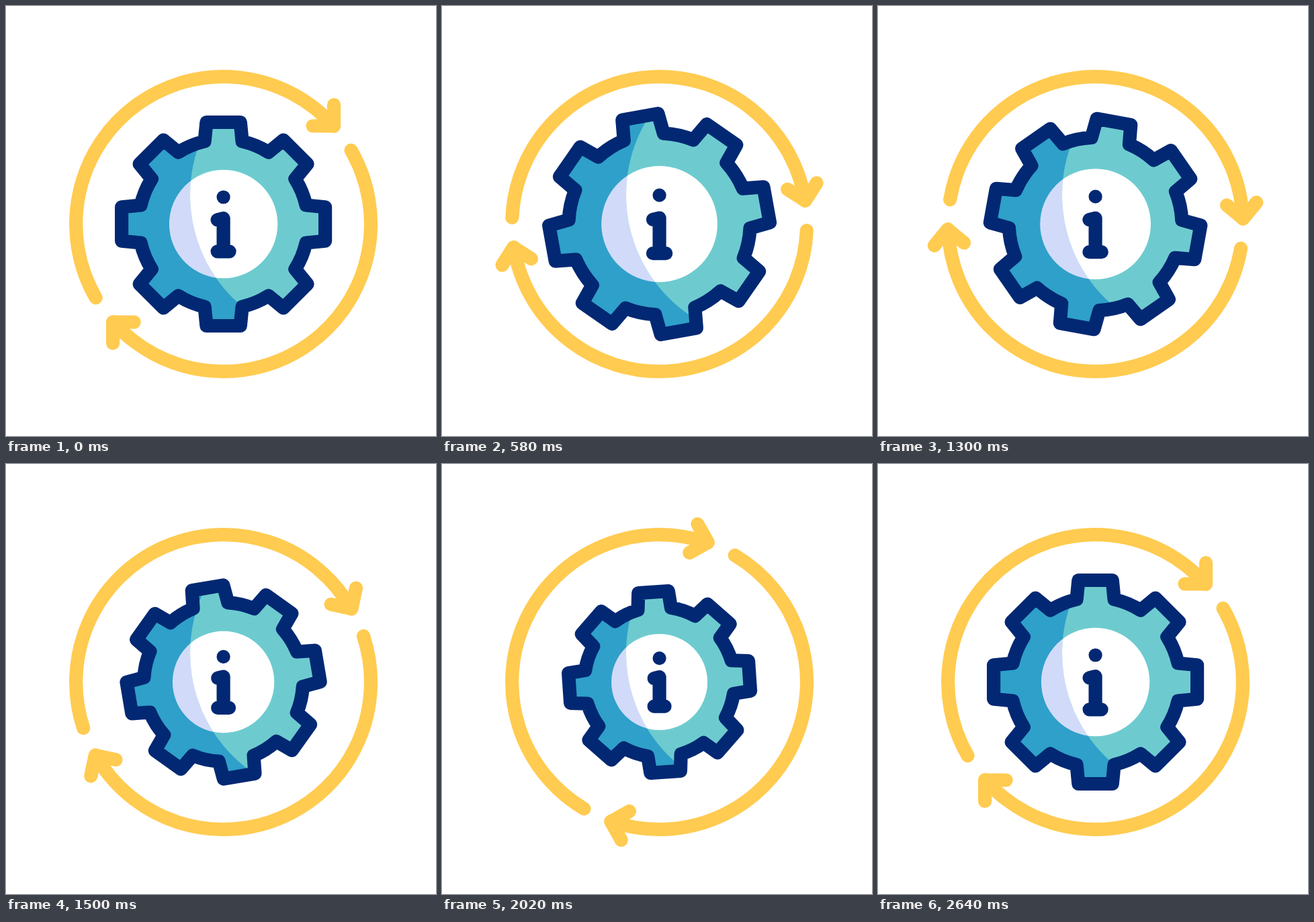
Animation, 640 px wide and 640 px high, one loop 3000 ms. Source, as an HTML page:

```html
<!DOCTYPE html>
<html lang="en">
<head>
<meta charset="utf-8">
<title>Information gear</title>
<style>
  html, body { margin: 0; width: 100%; height: 100%; overflow: hidden; background: #fff; }
  svg { display: block; width: 100vw; height: 100vh; }
  .line { fill: none; stroke: #022873; stroke-width: 20.2; stroke-linecap: round; stroke-linejoin: round; }
  .line * { vector-effect: non-scaling-stroke; }
  .arrows { stroke: #ffcb50; }
</style>
</head>
<body>
<svg viewBox="0 0 640 640">
  <defs>
    <path id="gear"/>
    <circle id="hub" r="80.7"/>
    <g id="arrow">
      <path id="arc"/>
      <path d="M-164.5 177.3V146H-133"/>
    </g>
    <clipPath id="lit"><circle cx="167.4" cy="-43.4" r="217"/></clipPath>
  </defs>
  <g transform="translate(323.6 324.5)">
    <g class="line arrows" id="arrows">
      <use href="#arrow"/>
      <use href="#arrow" transform="rotate(180)"/>
    </g>
    <use class="spin" href="#gear" fill="#2fa0c9"/>
    <use class="grow" href="#hub" fill="#d1dbf9"/>
    <g clip-path="url(#lit)">
      <use class="spin" href="#gear" fill="#6dcbcf"/>
      <use class="grow" href="#hub" fill="#fff"/>
    </g>
    <g class="line"><path class="spin" id="rim"/></g>
    <g class="line"><g class="grow">
      <path d="M0 -40h.01M-9 -6.2L0 -8.4V40.8M-9 40.8H9"/>
    </g></g>
  </g>
</svg>
<script>
const LOOP = 3000, STEP = 20;
const byId = id => document.getElementById(id);

const polar = (r, deg) => {
  const a = deg * Math.PI / 180;
  return [r * Math.cos(a), r * Math.sin(a)].map(v => v.toFixed(2)).join(' ');
};

function gearPath(teeth) {
  const base = Math.hypot(28, 123);
  const corners = [[-28, -123], [-25.2, -151.5], [25.2, -151.5], [28, -123]];
  let d = '';
  for (let i = 0; i < teeth; i++) {
    corners.forEach(([x, y], k) => {
      const angle = Math.atan2(y, x) * 180 / Math.PI + i * 360 / teeth;
      const command = k ? 'L' : i ? `A${base} ${base} 0 0 1 ` : 'M';
      d += command + polar(Math.hypot(x, y), angle);
    });
  }
  return `${d}A${base} ${base} 0 0 1 ${polar(base, Math.atan2(-123, -28) * 180 / Math.PI)}Z`;
}

function arcPath(r, from, to) {
  return `M${polar(r, from)}A${r} ${r} 0 0 1 ${polar(r, (from + to) / 2)}A${r} ${r} 0 0 1 ${polar(r, to)}`;
}

const shape = gearPath(8);
byId('gear').setAttribute('d', shape);
byId('rim').setAttribute('d', shape);
byId('arc').setAttribute('d', arcPath(219.4, -30, 138.4));

// Keys are [time, value]; motion rests at the first and last key.
const arrowKeys = [[200, 0], [960, 65], [1960, -30], [2600, 0]];
const scaleKeys = [[200, 1], [900, 1.125], [1820, 0.866], [2640, 1]];
const spinKeys = [[200, 0], [580, -10.2], [920, -42.8], [1300, -79.8],
  [1700, -117.6], [2000, -138], [2300, -144.6], [2640, -135]];

const restAtKeys = () => 0;

function flowing(keys, i) {
  if (i === 0 || i === keys.length - 1) return 0;
  const [[t0, v0], [t1, v1], [t2, v2]] = keys.slice(i - 1, i + 2);
  const before = (v1 - v0) / (t1 - t0), after = (v2 - v1) / (t2 - t1);
  return (before * (t2 - t1) + after * (t1 - t0)) / (t2 - t0);
}

// Cubic Hermite interpolation with a chosen slope at each key.
function sample(keys, t, slope = restAtKeys) {
  const last = keys.length - 1;
  if (t <= keys[0][0]) return keys[0][1];
  if (t >= keys[last][0]) return keys[last][1];
  const i = keys.findIndex(key => key[0] > t) - 1;
  const [t0, v0] = keys[i], [t1, v1] = keys[i + 1];
  const span = t1 - t0, s = (t - t0) / span, r = 1 - s;
  return v0 * r * r * (1 + 2 * s) + v1 * s * s * (1 + 2 * r)
    + span * s * r * (slope(keys, i) * r - slope(keys, i + 1) * s);
}

const setAll = (selector, transform) =>
  document.querySelectorAll(selector).forEach(el => el.setAttribute('transform', transform));

function draw(t) {
  const scale = sample(scaleKeys, t);
  setAll('#arrows', `rotate(${sample(arrowKeys, t)})`);
  setAll('.grow', `scale(${scale})`);
  setAll('.spin', `rotate(${sample(spinKeys, t, flowing)}) scale(${scale})`);
}

const start = performance.now();
function tick() {
  const t = Math.max(0, performance.now() - start) % LOOP;
  draw(Math.floor(t / STEP) * STEP);
  requestAnimationFrame(tick);
}
draw(0);
requestAnimationFrame(tick);
</script>
</body>
</html>
```
